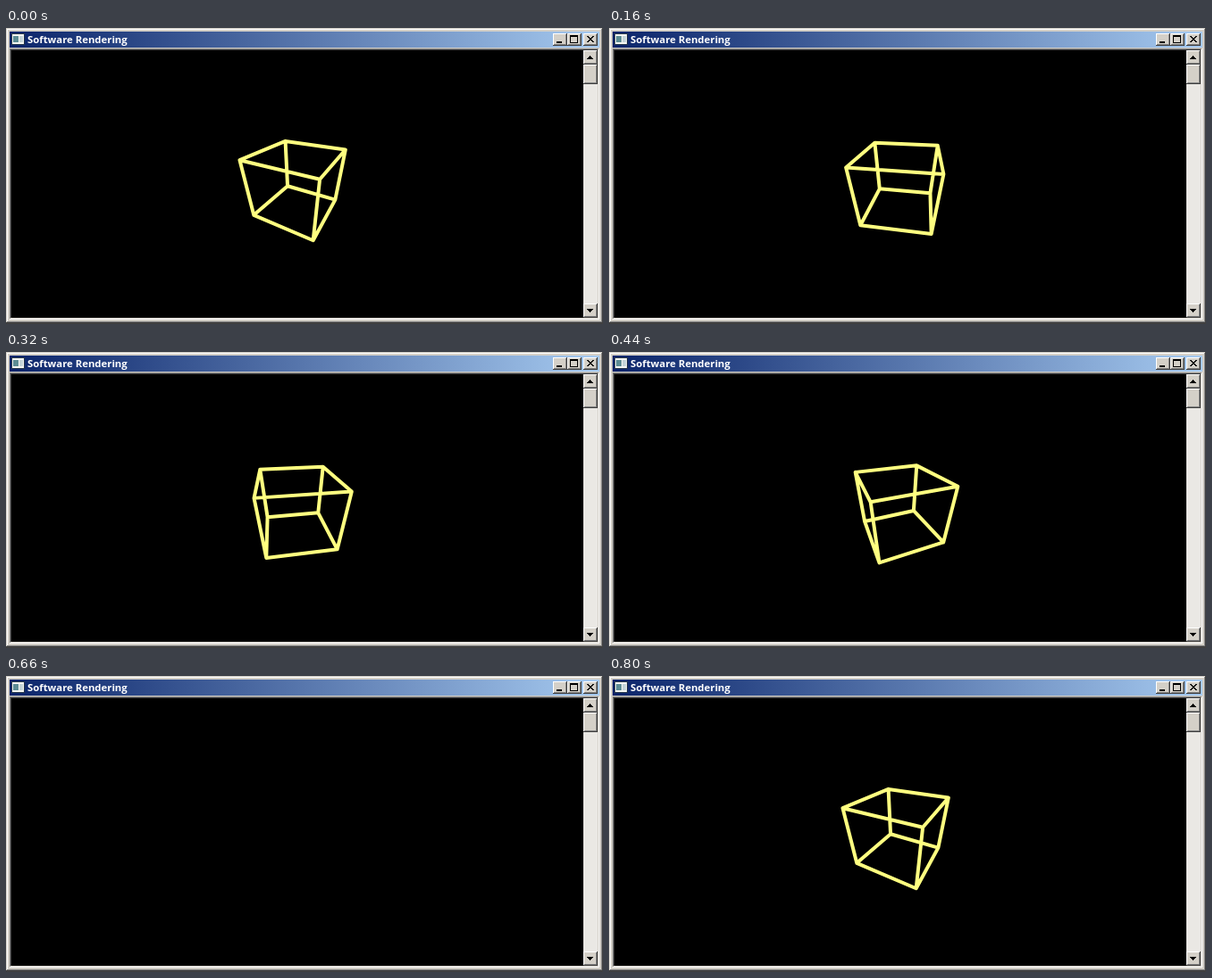
An HTML page with a canvas for the animation above (0.82 s loop, 668 by 332 pixels).

```html
<!DOCTYPE html>
<html lang="en">
<head>
<meta charset="utf-8">
<title>Software Rendering</title>
<style>
  html, body { margin: 0; width: 100%; height: 100%; overflow: hidden; background: #000; }
  canvas { display: block; }
</style>
</head>
<body>
<canvas id="stage" width="668" height="332"></canvas>
<script>
const ctx = document.getElementById('stage').getContext('2d');
const FACE = '#d4d0c8', LIGHT = '#ffffff', SHADOW = '#808080', DARK = '#404040';
const LOOP = 820, STEP = 20, BLANK_AT = 660;

// Perspective camera looking down on a cube with half-edge 1.
const PITCH = 0.581, DISTANCE = 4.28;
const FOCAL_X = 161.5, FOCAL_Y = 148, CENTER_X = 326, CENTER_Y = 175;
// Time in ms, heading in degrees.
const HEADINGS = [[0, 16.6], [160, 36], [580, 83], [800, 106.6], [820, 106.6]];

function fill(color, x, y, w, h) {
  ctx.fillStyle = color;
  ctx.fillRect(x, y, w, h);
}

// One-pixel edge: first colour on top and left, second on bottom and right.
function edge(x, y, w, h, topLeft, bottomRight) {
  fill(topLeft, x, y, w, 1);
  fill(topLeft, x, y, 1, h);
  fill(bottomRight, x, y + h - 1, w, 1);
  fill(bottomRight, x + w - 1, y, 1, h);
}

function button(x, y, w, h) {
  fill(FACE, x, y, w, h);
  edge(x, y, w, h, LIGHT, DARK);
  edge(x + 1, y + 1, w - 2, h - 2, FACE, SHADOW);
}

function arrow(x, y, direction) {
  for (let i = 0; i < 4; i++) fill('#000', x - i, y + i * direction, 2 * i + 1, 1);
}

function drawTitleBar() {
  const gradient = ctx.createLinearGradient(4, 0, 664, 0);
  gradient.addColorStop(0, '#0a246a');
  gradient.addColorStop(1, '#a6caf0');
  fill(gradient, 4, 4, 660, 18);

  fill('#26364a', 6, 6, 15, 13);
  fill('#f4f6f2', 7, 7, 13, 11);
  fill('#5c8c94', 8, 9, 6, 7);
  fill('#c4d4d8', 15, 9, 4, 7);

  ctx.fillStyle = '#fff';
  ctx.font = 'bold 11.35px "Open Sans", "Noto Sans", sans-serif';
  ctx.fillText('Software Rendering', 24, 17);

  for (const x of [612, 628, 646]) button(x, 6, 16, 14);
  fill('#000', 616, 15, 6, 2);
  edge(631, 8, 9, 9, '#000', '#000');
  fill('#000', 631, 9, 9, 1);
  for (let i = 0; i < 7; i++) {
    fill('#000', 650 + i, 9 + i, 2, 1);
    fill('#000', 656 - i, 9 + i, 2, 1);
  }
}

function drawScrollBar() {
  fill('#eae8e4', 646, 25, 16, 300);
  button(646, 25, 16, 16);
  button(646, 41, 16, 22);
  button(646, 309, 16, 16);
  arrow(653, 31, 1);
  arrow(653, 318, -1);
}

function drawWindow() {
  fill(DARK, 0, 0, 668, 332);
  fill(FACE, 0, 0, 668, 331);
  edge(0, 0, 668, 331, FACE, DARK);
  edge(1, 1, 666, 329, LIGHT, SHADOW);
  drawTitleBar();
  edge(4, 23, 660, 304, SHADOW, LIGHT);
  edge(5, 24, 658, 302, DARK, FACE);
  fill('#000', 6, 25, 640, 300);
  drawScrollBar();
}

function headingAt(time) {
  const i = HEADINGS.findIndex(([t]) => t > time);
  const [t0, a0] = HEADINGS[i - 1], [t1, a1] = HEADINGS[i];
  return (a0 + (a1 - a0) * (time - t0) / (t1 - t0)) * Math.PI / 180;
}

function project(angle, height) {
  const x = Math.SQRT2 * Math.sin(angle), z = Math.SQRT2 * Math.cos(angle);
  const c = Math.cos(PITCH), s = Math.sin(PITCH);
  const depth = DISTANCE - z * c - height * s;
  return [CENTER_X + FOCAL_X * x / depth, CENTER_Y - FOCAL_Y * (height * c - z * s) / depth];
}

function drawCube(heading) {
  ctx.beginPath();
  for (let i = 0; i < 4; i++) {
    const angle = heading + i * Math.PI / 2, next = angle + Math.PI / 2;
    ctx.moveTo(...project(next, 1));
    ctx.lineTo(...project(angle, 1));
    ctx.lineTo(...project(angle, -1));
    ctx.lineTo(...project(next, -1));
  }
  ctx.strokeStyle = '#ffff80';
  ctx.lineWidth = 4;
  ctx.lineCap = ctx.lineJoin = 'round';
  ctx.stroke();
}

function render() {
  const time = Math.floor(performance.now() % LOOP / STEP) * STEP;
  drawWindow();
  if (time !== BLANK_AT) drawCube(headingAt(time));
  requestAnimationFrame(render);
}
render();
</script>
</body>
</html>
```
